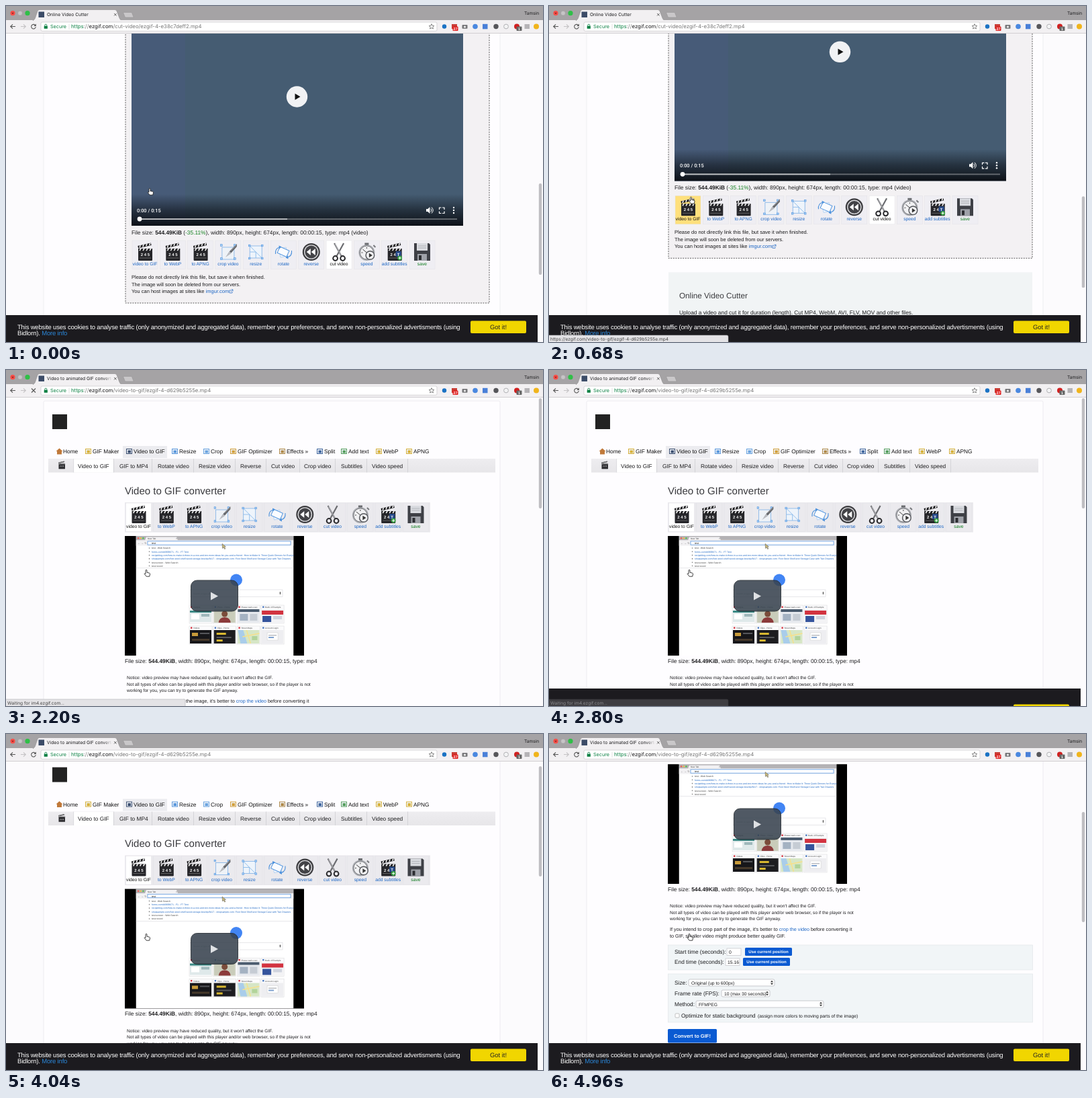
These frames come from a looping animation (800x500 px, 5000 ms). An HTML page:

```html
<!DOCTYPE html>
<html lang="en">
<head>
<meta charset="utf-8">
<title>Video to GIF</title>
<style>
html,body{margin:0;width:100%;height:100%;overflow:hidden;background:#fdfcfe}
svg{display:block;width:800px;height:500px;font-family:"Liberation Sans",Arial,sans-serif;text-rendering:geometricPrecision}
text{white-space:pre}
.ui{font-family:Inter,sans-serif}
.m{text-anchor:middle}
.b{font-weight:bold}
</style>
</head>
<body>
<svg id="stage" viewBox="0 0 800 500" xmlns="http://www.w3.org/2000/svg"></svg>
<script>
const LOOP = 5000, STEP = 40, LOAD = 2200;
const INK = '#1c1c1e', LINK = '#1c66c4', BLUE = '#0a5ad2';

// markup helpers
const T = (x, y, size, s, a = '') => `<text x="${x}" y="${y}" font-size="${size}" ${a}>${s}</text>`;
const R = (x, y, w, h, fill, a = '') => `<rect x="${x}" y="${y}" width="${w}" height="${h}" fill="${fill}" ${a}/>`;
const C = (x, y, r, fill, a = '') => `<circle cx="${x}" cy="${y}" r="${r}" fill="${fill}" ${a}/>`;
const P = (d, fill, a = '') => `<path d="${d}" fill="${fill}" ${a}/>`;
const L = (d, color, w = 1, a = '') => P(d, 'none', `stroke="${color}" stroke-width="${w}" ${a}`);
const G = (x, y, s, a = '') => `<g transform="translate(${x} ${y})" ${a}>${s}</g>`;
const fill = c => `fill="${c}"`;
const span = (s, c) => `<tspan fill="${c}">${s}</tspan>`;

// tool icons, centred on the origin
const clap = R(-10, -2, 21, 15, '#26262a', 'rx="1"') +
  R(-10, -5, 21, 3.4, '#1b1b1e') + L('M-8-2l2-3M-3-2l2-3M2-2l2-3M7-2l2-3', '#eee', 1.7) +
  `<g transform="rotate(-13 -10 -6)">${R(-10, -9, 20, 3.4, '#1b1b1e')}${L('M-6-9l-2 3M-1-9l-2 3M4-9l-2 3M9-9l-2 3', '#eee', 1.7)}</g>` +
  T(.5, 6, 6, '2 4 5', 'class="m b" fill="#f4f4f4"') + L('M-8 9h17', '#777', .7);
const corners = (a, b) => [[a, a], [b, a], [a, b], [b, b]].map(([x, y]) => R(x - 1.3, y - 1.3, 2.6, 2.6, '#a8cff5', 'stroke="#4f93de" stroke-width=".6"')).join('');
const crop = R(-9, -7, 18, 18, '#eef2f7', 'stroke="#7db0e6" stroke-width=".8"') + corners(-10, 10) +
  P('M13-12L3-2-1 4 5 1 13-8z', '#66686c') + P('M2-1l-6 9 9-6z', '#b9bbc0') + L('M12-10L4-2', '#a6a8ac', .8);
const resize = R(-9, -9, 18, 18, '#eef4fb', 'stroke="#7db0e6" stroke-width=".8"') +
  L('M-9-9L9 9M-9 0h9v9', '#8bbaea', .9) + corners(-9.5, 9.5);
const rotate = R(-6, -6, 11, 13, '#eef4fc', 'stroke="#a9cbef" stroke-width=".7" transform="rotate(-12)"') +
  R(-8, -5, 15, 10, '#fafcff', 'stroke="#4a90dc" stroke-width=".9" transform="rotate(24)"') +
  L('M-12 3q-1-8 6-10M12-2q1 8-6 10', '#4a90dc', 1.1) + P('M-7-9.500l4 2-3.500 3zM7 10.500l-4-2 3.500-3z', '#4a90dc');
const reverse = C(0, 0, 13, '#3b3b3e') + C(0, 0, 10.8, '#d9d9dc') + C(0, 0, 9.4, '#434347') +
  P('M-1-5v10l-6-5zM6-5v10l-6-5z', '#fff');
const cut = L('M-7-13L4 7M7-13L-4 7', '#6b6c70', 2.2) + L('M-6-12L3 5', '#d4d4d8', .8) +
  C(-5.5, 9.5, 3.4, 'none', 'stroke="#2a2a2d" stroke-width="2"') + C(5.5, 9.5, 3.4, 'none', 'stroke="#2a2a2d" stroke-width="2"');
const speed = C(0, 1, 12, '#a9abb0') + C(0, 1, 10, '#f0f0f2', 'stroke="#66686c" stroke-width=".8"') +
  R(-3, -13.5, 6, 3, '#6a6c70') + L('M10-10l3 3', '#77797d', 2) + L('M0 1L-6-4M-8 1h2M0-7v2', '#444', 1) +
  C(5, 5, 7, '#55575c') + C(5, 5, 5.6, '#f0f0f2') + P('M3.500 1.800v6.400l5-3.200z', '#333');
const subs = clap + R(2, -1, 8, 8, '#274a8a') + T(6, 5.5, 6, 'T', 'class="m b" fill="#fff"') + C(8, 9, 3.4, '#37a043') + L('M6 9h4M8 7v4', '#fff', 1);
const save = P('M-12-13h22l2 2v24h-24z', '#3e4046') + R(-8, -13, 16, 11, '#d9dbe0') + L('M-6-9h12M-6-6h12', '#a9abb1', .8) +
  R(-7, 3, 14, 10, '#9fa2a9') + R(-5, 5, 4, 7, '#2c2d31');
const tools = [['video to GIF', clap], ['to WebP', clap], ['to APNG', clap], ['crop video', crop], ['resize', resize],
  ['rotate', rotate], ['reverse', reverse], ['cut video', cut], ['speed', speed], ['add subtitles', subs], ['save', save]];

const toolbar = (x, y, active, id, box) => tools.map(([name, icon], i) => {
  const cx = x + i * 41.3;
  const c = i === active ? '#111' : i === 10 ? '#0c7a1c' : LINK;
  return R(cx - 19, y, 38, 42.5, i === active ? '#fff' : box, `id="${id}b${i}" stroke="#e3e2e7" stroke-width=".5"`) +
    G(cx, y + 17, icon) + T(cx, y + 37.2, 6.75, name, `id="${id}l${i}" class="m" ${fill(c)}`);
}).join('');

const meta = (y, x, extra, end) => T(x, y, 8.34, `File size: <tspan class="b">544.49KiB</tspan>${extra}, width: 890px, height: 674px, length: 00:00:15, type: mp4${end}`, fill(INK));

// first page
const cutter =
  R(56, -200, 680, 1200, '#fefdff', 'stroke="#ebeaee" stroke-width=".8"') +
  R(178, -200, 542, 642, '#f3f1f3', 'stroke="#333" stroke-width=".8" stroke-dasharray="2 1.6"') +
  R(187, -200, 494, 527, '#455c72') + R(187, -200, 80, 527, '#475b78') + R(187, 280, 494, 47, 'url(#shade)') +
  C(433.5, 135, 15.7, '#f1f2f4') + P('M430.5 130.3v9.4l8-4.7z', '#111') +
  T(195, 307, 7.4, '0:00 / 0:15', 'fill="#fff" font-weight="500" style="font-family:Roboto,sans-serif"') +
  P('M626 302h2.4l3-3v10l-3-3H626z', '#fff') + L('M633 301.5q2 2.5 0 5M634 299.5q4.500 4.500 0 9', '#fff', 1) +
  L('M645.500 303v-3h3M650 300h3v3M653 305.500v3h-3M648.500 308.500h-3v-3', '#fff', 1.2) +
  [300, 304, 308].map(y => C(667, y, 1.2, '#fff')).join('') +
  R(197, 316.2, 475, 1.8, '#fff', 'opacity=".35"') + R(197, 316.2, 222, 1.8, '#fff', 'opacity=".6"') + C(199, 317, 3.4, '#fff') +
  meta(339.5, 187, ` (${span('-35.11%', '#12801f')})`, ' (video)') +
  toolbar(207, 349, 7, 'c', '#efeef3') +
  T(187, 406, 7.5, 'Please do not directly link this file, but save it when finished.', fill(INK)) +
  T(187, 416.5, 7.5, 'The image will soon be deleted from our servers.', fill(INK)) +
  T(187, 427, 7.5, 'You can host images at sites like ' + span('imgur.com', LINK), fill(INK)) +
  L('M335 423h-2v4h4v-2M335.500 422h2.500v2.500M338 422l-3 3', LINK, .7) +
  R(178, 463, 542, 200, '#f1f4f5') + T(194, 501.5, 11.7, 'Online Video Cutter', 'fill="#3a3a3e"') +
  T(194, 525.5, 8.34, 'Upload a video and cut it for duration (length). Cut MP4, WebM, AVI, FLV, MOV and other files.', fill(INK));

// second page
const nav = [[85, 'Home', '#c0793a'], [129, 'GIF Maker', '#d8b23c'], [190, 'Video to GIF', '#3c4f70'], [258, 'Resize', '#5b98dc'],
  [305, 'Crop', '#6aa3df'], [345, 'GIF Optimizer', '#d3a03c'], [418, 'Effects »', '#b08a4a'], [474, 'Split', '#43689f'],
  [510, 'Add text', '#58a060'], [562, 'WebP', '#d8b23c'], [607, 'APNG', '#d8b23c']];
const navIcon = (x, c, i) => i === 0
  ? P(`M${x - 10.5} 121l5-4.500 5 4.500h-1.500v4.500h-7v-4.500z`, c)
  : R(x - 10.5, 117.5, 8, 7, '#eef2f8', `stroke="${c}" stroke-width="1"`) + R(x - 8.5, 119.5, 4.5, 4, c);
const sub = [[107, 'Video to GIF', 160], [169, 'GIF to MP4', 217], [226, 'Rotate video', 279], [287, 'Resize video', 341],
  [349, 'Reverse', 387], [395, 'Cut video', 437], [444, 'Crop video', 490], [499, 'Subtitles', 537], [545, 'Video speed', 598]];

const tileArt = [
  R(1, 8, 32, 17, '#dfe9ea') + R(1, 8, 32, 3, '#3a8a86') + R(3, 13, 12, 8, '#fff') + R(18, 13, 12, 4, '#9fb8bb'),
  R(1, 6, 32, 20, '#c9ccba') + C(17, 13, 4.5, '#7b4c3a') + P('M8 26q1-8 9-8t9 8z', '#8c3b3b'),
  R(1, 6, 32, 20, '#e6e9ee') + R(1, 6, 32, 4, '#4a5b6e') + R(4, 13, 12, 10, '#a4b2c2') + R(19, 13, 11, 10, '#c6ccd4'),
  R(1, 6, 32, 20, '#f3f3f5') + R(1, 8, 32, 6, '#d23340') + R(2, 16, 13, 9, '#35549c') + R(18, 16, 13, 5, '#d0d4de'),
  R(1, 6, 32, 20, '#17171a') + R(4, 10, 9, 5, '#c79a3a') + R(16, 10, 14, 2, '#55565a') + R(4, 19, 26, 3, '#46392a'),
  R(1, 6, 32, 20, '#1d1d20') + R(5, 10, 14, 3, '#d8b830') + R(5, 16, 22, 2, '#55565a') + R(5, 20, 9, 3, '#d8b830'),
  R(1, 6, 32, 20, '#d6e6c6') + P('M1 6h8l6 20H5z', '#a9cdea') + L('M14 6l6 20M8 16l25-5', '#f6e08a', 1.4) + R(22, 15, 8, 6, '#b2d49a'),
  R(1, 6, 32, 20, '#eeeef1') + R(9, 10, 16, 11, '#fff', 'stroke="#ccc" stroke-width=".5"') + R(11, 13, 12, 1.5, '#b9bcc2') + R(11, 16, 8, 2, '#7fa2d0')];
const tileName = ['Sample', 'Photo - Home', 'Please wait a sec', 'Bank of Example', 'Videos', 'Clips - Home', 'Street Maps', 'Account Login'];
const tiles = tileArt.map((art, i) => G(273 + i % 4 * 35.7, 350 + (i > 3) * 31, R(0, 0, 34, 27, '#fbfbfc', 'stroke="#d5d5d8" stroke-width=".5"') +
  R(2, 1.5, 2.4, 2.4, ['#d23340', '#4a78c0'][i % 2]) + T(6, 4.4, 3.1, tileName[i], 'fill="#444"') + art)).join('');
const hints = [['test - Web Search', '#444'], ['forms.com/d/8f0f8/71 - F1 - F7 Tent', LINK],
  ['recipeblog.com/how-to-make-it-three-in-a-row-and-ten-more-ideas-for-you-and-a-friend - How to Make It: Three Quick Dinners for Everyone', LINK],
  ['shopsample.com/foot-stool-shelf-wood-storage-box/dp/8417 - shopsample.com: Foot Stool Shelf and Storage Case with Two Drawers', LINK],
  ['test screen - Web Search', '#444'], ['test record', '#444']];
const preview = R(177, 247, 267, 178, '#000') + `<g clip-path="url(#pic)">` + R(193.5, 247, 235, 178, '#fff') +
  R(193.5, 247, 235, 6.5, '#b4b2b5') + C(197, 250.3, 1.2, '#f05a50') + C(200.7, 250.3, 1.2, '#f0bd40') + C(204.4, 250.3, 1.2, '#50c050') +
  P('M207 253.500l2-5h45l2 5z', '#f2f1f3') + T(211, 252.2, 3.2, 'New Tab', 'fill="#444"') + T(253, 252.2, 3.4, '×', 'fill="#555"') +
  R(193.5, 253.5, 235, 8, '#f2f1f3') + R(211, 254.8, 213, 5.4, '#fff', 'stroke="#5b98e0" stroke-width=".8"') +
  T(196, 259.3, 4, '← → ↻', 'fill="#777"') + T(217, 259, 3.8, 'test', fill(INK)) +
  hints.map(([s, c], i) => C(213.5, 265 + i * 5.3, .8, '#777') + T(217, 266.3 + i * 5.3, 3.5, s, fill(c))).join('') +
  R(193.5, 294.5, 235, .6, '#d8d8dc') + C(343, 312.5, 9, '#4285f4') +
  R(274, 327, 138, 10.5, '#fff', 'stroke="#d8d8dc" stroke-width=".6"') + T(279, 333.5, 3.2, 'Search or type an address', 'fill="#aaa"') + R(407.7, 330, 1.6, 4, '#666', 'rx=".8"') +
  tiles + P('M322 258.500l5.500 4.500-2.500.300 2 2.500-1.300.8-1.700-2.700-1.500 1.600z', '#c8b878', 'stroke="#555" stroke-width=".5"') + '</g>' +
  R(275.5, 313, 70, 46, '#38434f', 'rx="9" opacity=".88" stroke="#20262c" stroke-width="1"') + P('M305 330.500v12l11-6z', '#dfe1e4');

const button = (x, y, w, h, size, s) => R(x, y, w, h, BLUE, 'rx="1.5"') + T(x + w / 2, y + h / 2 + size * .35, size, s, 'class="m b" fill="#fff"');
const field = (x, y, s) => R(x, y, 21, 10.5, '#fff', 'stroke="#c4c4c8" stroke-width=".7"') + T(x + 3, y + 8, 6.8, s, fill(INK));
const select = (x, y, w, s) => R(x, y, w, 10, '#fff', 'rx="2" stroke="#b5b5ba" stroke-width=".7"') + T(x + 4, y + 7.5, 6.7, s, fill(INK)) +
  P(`M${x + w - 6} ${y + 4.3}h4l-2-2.600zM${x + w - 6} ${y + 5.7}h4l-2 2.600z`, '#333');
const panel = (y, h) => R(177.500, y, 543, h, '#f1f5f7', 'stroke="#e1e6e8" stroke-width=".7"');
const note = (y, size, s) => T(180, y, size, s, fill(INK));

const converter =
  R(56, 46, 680, 1200, '#fefdff', 'rx="2" stroke="#e9e8ec" stroke-width=".8"') +
  R(69, 66, 22, 22, '#222') +
  R(174, 113, 66, 18, '#ececf0') +
  nav.map(([x, s, c], i) => navIcon(x, c, i) + T(x, 124, 8.34, s, 'fill="#111"')).join('') +
  R(63, 132, 666, 20.5, 'url(#strip)') + R(101, 132.5, 59, 20, '#fff') +
  G(83, 141.5, `<g transform="scale(.45)">${clap}</g>`) + R(100.5, 132, .6, 20.5, '#cfcfd4') +
  sub.map(([x, s, e]) => T(x, 145.8, 8.34, s, fill(INK)) + R(e, 132, .7, 20.5, '#cacace')).join('') +
  T(177, 184.7, 15, 'Video to GIF converter', 'fill="#3a3a3e"') +
  R(177, 197, 455, 44.5, '#eae9ed') + toolbar(197.5, 198, 0, 'v', '#ebeaee') +
  preview + meta(435.8, 177, '', '') +
  note(460, 6.62, "Notice: video preview may have reduced quality, but it won't affect the GIF.") +
  note(469.5, 6.62, 'Not all types of video can be played with this player and/or web browser, so if the player is not') +
  note(479, 6.62, 'working for you, you can try to generate the GIF anyway.') +
  note(494.7, 7.23, `If you intend to crop part of the image, it's better to ${span('crop the video', LINK)} before converting it`) +
  note(504.7, 7.23, 'to GIF, smaller video might produce better quality GIF.') +
  panel(516, 37) + T(187, 529, 8.3, 'Start time (seconds):', fill(INK)) + field(265, 521, '0') + button(292, 520, 70, 12, 6.1, 'Use current position') +
  T(187, 544, 8.3, 'End time (seconds):', fill(INK)) + field(263, 536, '15.16') + button(289, 535, 70, 12, 6.1, 'Use current position') +
  panel(559, 72) + T(187, 575, 8.3, 'Size:', fill(INK)) + select(208, 567, 128, 'Original (up to 600px)') +
  T(187, 590.5, 8.3, 'Frame rate (FPS):', fill(INK)) + select(257, 583, 72, '10 (max 30 seconds)') +
  T(187, 606.5, 8.3, 'Method:', fill(INK)) + select(219, 599, 190, 'FFMPEG') +
  R(188, 618, 6, 6, '#fff', 'rx="1" stroke="#aaa" stroke-width=".7"') +
  T(197, 623.5, 8.2, 'Optimize for static background', fill(INK)) + T(311, 623.5, 6.8, '(assign more colors to moving parts of the image)', fill(INK)) +
  button(177, 641, 73, 20.5, 7.55, 'Convert to GIF!');

// browser frame
const url = (id, path) => T(97, 33.4, 7.8, span('https', '#0b8043') + span('://', '#777') + span('ezgif.com', INK) + span(path, '#777'), `id="${id}" class="ui"`);
const badge = (x, c, s) => R(x - 3.5, 30.5, 8, 6.5, c, 'rx="1"') + T(x + .5, 35.8, 5.4, s, 'class="m b" fill="#fff"');
const frame =
  R(0, 0, 800, 21.5, '#a5a3a5') + R(0, 21, 800, 20, '#f2f0f2') + R(0, 40.3, 800, .7, '#c4c2c5') +
  C(10, 10.7, 3.6, '#f8504a') + L('M8.700 9.400l2.600 2.600M11.300 9.400l-2.600 2.600', '#7a1512', .8) +
  C(21, 10.7, 3.4, '#c6c4c6', 'stroke="#989698" stroke-width=".5"') + C(32, 10.7, 3.6, '#2fbf47') +
  P('M40 21.500q2.500-.5 3.500-3.500l3.500-10.500q1-2 3-2h112q2 0 3 2l4 10.500q1 3 3.500 3.500z', '#f2f0f2', 'stroke="#8e8c8e" stroke-width=".6"') +
  R(41, 21, 132, 1.5, '#f2f0f2') +
  R(48.5, 8.5, 8.5, 8.5, '#3c4c68', 'id="fav"') + L('M51 13a2.500 2.500 0 0 1 2.500-3', '#777', .9, 'id="spin"') +
  T(61, 15.2, 6.7, 'Online Video Cutter', `id="ttlA" class="ui" ${fill(INK)}`) +
  `<g id="ttlB" clip-path="url(#tab)">${T(61, 15.2, 6.7, 'Video to animated GIF converter', `class="ui" fill="url(#fade)"`)}</g>` +
  L('M161 11l3.600 3.600M164.600 11l-3.600 3.600', '#555', .9) +
  P('M174.500 9.500h11.500q1.200 0 1.700 1l2.500 6.500h-11.500q-1.200 0-1.700-1z', '#c9c7c9', 'stroke="#8e8c8e" stroke-width=".5"') +
  T(772, 13.2, 6.6, 'Tamsin', `class="ui" ${fill(INK)}`) +
  L('M14 30.500H7M10 27.300l-3.300 3.200 3.300 3.200', '#555', 1.1) + L('M22 30.500h7M26 27.300l3.300 3.200-3.300 3.200', '#c4c2c4', 1.1) +
  `<g id="reload">${L('M43.600 28.600a3.300 3.300 0 1 0 .7 2.600', '#555', 1.1)}${P('M44.800 26.500v3.500h-3.500z', '#555')}</g>` +
  L('M38 27.500l6 6M44 27.500l-6 6', '#555', 1.1, 'id="stop"') +
  R(52, 24, 590, 13.3, '#fff', 'rx="2" stroke="#c9c7ca" stroke-width=".7"') +
  R(56.7, 29.8, 5.2, 4, '#0b8043', 'rx=".6"') + L('M57.800 30v-1.300a1.500 1.500 0 0 1 3 0V30', '#0b8043', .9) +
  T(66, 33.4, 7.2, 'Secure', 'class="ui" fill="#0b8043"') + R(93.7, 26.5, .6, 8.5, '#ccc') +
  url('urlA', '/cut-video/ezgif-4-e38c7deff2.mp4') + url('urlB', '/video-to-gif/ezgif-4-d629b5255e.mp4') +
  P('M634 26.700l1.100 2.500 2.700.3-2 1.800.6 2.700-2.400-1.400-2.400 1.400.6-2.700-2-1.800 2.700-.3z', 'none', 'stroke="#666" stroke-width=".8"') +
  C(653, 30.5, 3.2, '#1a72c4') + R(664, 27, 8, 7, '#c93c35') + badge(669, '#e02020', '27') +
  R(679.5, 28, 8, 5.8, '#77777a', 'rx="1"') + C(683.5, 31, 1.6, '#eee') + C(699, 30.5, 3.8, '#4a88e0') + R(710, 26.8, 7.5, 7.5, '#4a80d8') +
  C(730, 30.5, 3.7, '#56565a') + C(745, 30.5, 3.4, '#f4f4f5', 'stroke="#b0b0b4" stroke-width="1"') + C(761, 30.5, 4, '#d02020') + badge(764, '#666', '1') +
  R(772.5, 27, 7.5, 7, '#b5b3b6') + C(790, 30.5, 4, '#f0b41c');

// the bar stops short of the scroll track
const cookie = R(0, 0, 792, 500, '#1c1b1f', 'id="band"') + '<g id="msg" fill="#fff">' +
  T(17, 480.6, 9.5, 'This website uses cookies to analyse traffic (only anonymized and aggregated data), remember your preferences, and serve non-personalized advertisments (using', 'letter-spacing="-.18"') +
  T(17, 490.2, 9.5, 'Bidlorn). ' + span('More info', '#2a86d8'), 'letter-spacing="-.18"') +
  R(692, 468.5, 83, 18.5, '#f1d600', 'rx="2"') + T(733.5, 480.8, 9.4, 'Got it!', 'class="m" fill="#222"') + '</g>';

const status = R(-2, 490, 269, 12, '#e4e3e6', 'id="sbg" rx="2" stroke="#b0afb3" stroke-width=".6"') + T(2, 497.7, 6.6, '', 'id="stx" class="ui"');
const hand = P('M-1 1.200q0-1.400 1-1.400t1 1.400v2.600l3.400.8q1.300.4 1.100 1.800l-.8 3.300h-4.600l-2.900-3.700q-.1-1.300 1.800-.3z', '#fff', 'stroke="#111" stroke-width=".8" stroke-linejoin="round"');

const stop = (o, c, a = 1) => `<stop offset="${o}" stop-color="${c}" stop-opacity="${a}"/>`;
const stage = document.getElementById('stage');
stage.innerHTML = '<defs>' +
  `<linearGradient id="shade" x2="0" y2="1">${stop(0, '#10161d', 0)}${stop(.5, '#10161d', .6)}${stop(1, '#0a0d12', .95)}</linearGradient>` +
  `<linearGradient id="strip" x2="0" y2="1">${stop(0, '#eeedf0')}${stop(1, '#e7e6e9')}</linearGradient>` +
  `<linearGradient id="fade" gradientUnits="userSpaceOnUse" x1="145" x2="158">${stop(0, INK)}${stop(1, INK, 0)}</linearGradient>` +
  '<clipPath id="pic"><rect x="193.5" y="247" width="235" height="178"/></clipPath>' +
  '<clipPath id="tab"><rect x="60" y="5" width="98" height="15"/></clipPath></defs>' +
  R(0, 0, 800, 500, '#fcfbfd') + `<g id="pageA">${cutter}</g><g id="pageB">${converter}</g>` +
  R(793.8, 0, 4.4, 100, '#bfbec2', 'id="thumb" rx="2.2"') +
  `<g id="cookie">${cookie}</g><g id="status">${status}</g>${frame}<g id="hand">${hand}</g>`;

const el = {};
stage.querySelectorAll('[id]').forEach(e => el[e.id] = e);
const set = (id, k, v) => el[id].setAttribute(k, v);
const show = (id, on) => set(id, 'display', on ? 'inline' : 'none');
const move = (id, x, y) => set(id, 'transform', `translate(${x.toFixed(2)} ${y.toFixed(2)})`);
const part = (t, a, b) => Math.min(1, Math.max(0, (t - a) / (b - a)));

function draw(t) {
  const fresh = t >= LOAD;
  const scrollA = 69 * (1 - Math.exp(-t / 200));
  const scrollB = 202 * (1 - (1 - part(t, 4000, 4960)) ** 2);
  show('pageA', !fresh);
  show('pageB', fresh);
  move('pageA', 0, -scrollA);
  move('pageB', 0, -scrollB);
  set('thumb', 'y', fresh ? 42 + scrollB * .366 : 264 + scrollA * .29);
  set('thumb', 'height', fresh ? 164 : 136);

  const u = part(t, 480, 880), k = u * u * (3 - 2 * u);
  move('hand', 214 - 5 * k, 271.5 + 26 * k);
  const hover = k > .45;
  set('cb0', 'fill', hover ? '#ffe07c' : '#efeef3');
  set('cl0', 'fill', hover ? '#111' : LINK);

  const busy = t >= 1200 && t < 2700;
  show('stop', busy);
  show('reload', !busy);
  show('spin', busy && !fresh);
  show('fav', !busy || fresh);
  for (const id of ['ttl', 'url']) {
    show(id + 'A', !fresh);
    show(id + 'B', fresh);
  }

  const fade = 1 - part(t, 2700, 2820);
  show('status', hover && fade > 0);
  set('sbg', 'opacity', fade);
  set('stx', 'fill', fade < .5 ? '#8c8c8f' : '#444');
  el.stx.textContent = fresh ? 'Waiting for im4.ezgif.com...' : 'https://ezgif.com/video-to-gif/ezgif-4-d629b5255e.mp4';

  const drop = fresh ? 40 * (1 - part(t, 2560, 2929)) : 0;
  set('band', 'y', 460 + drop);
  move('msg', 0, drop * 2.07);
}

function tick(now) {
  draw(Math.floor(now % LOOP / STEP) * STEP);
  requestAnimationFrame(tick);
}
draw(0);
requestAnimationFrame(tick);
</script>
</body>
</html>
```
